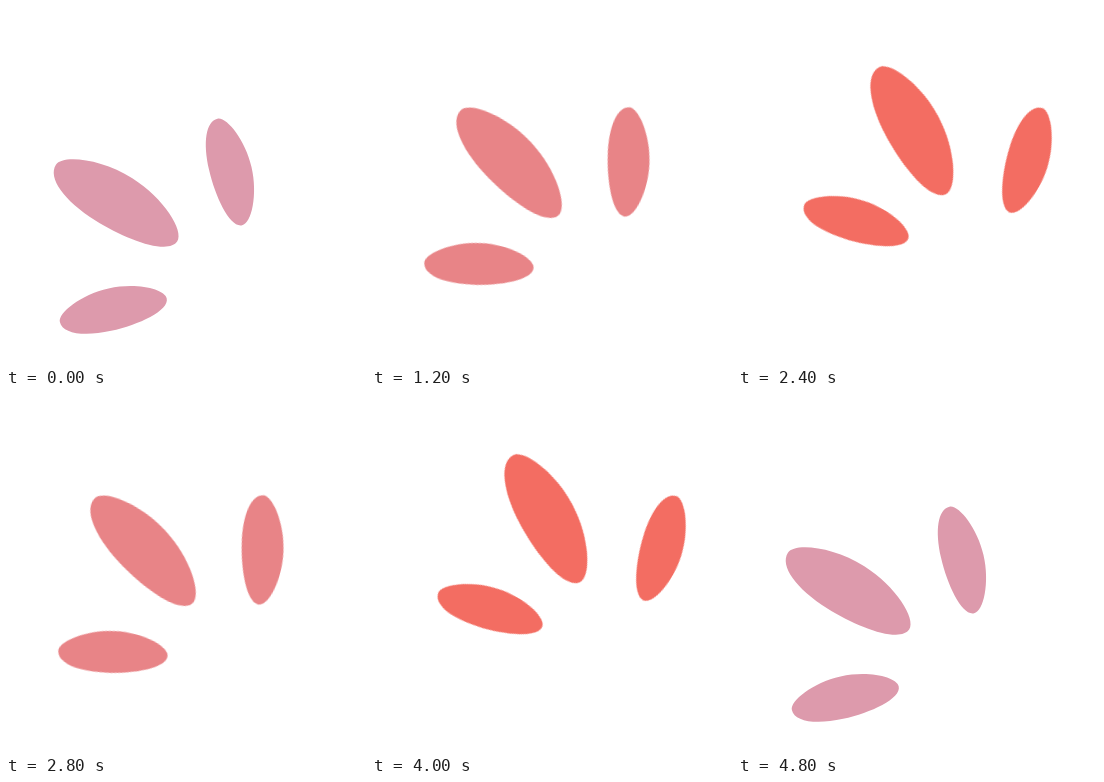
Recreate the animation shown at these times as an HTML page without scripts. Size 360 px wide and 360 px high, loop 5.2 s.

```html
<!DOCTYPE html>
<html lang="en">
<head>
<meta charset="utf-8">
<title>Swinging petals</title>
<style>
  html, body {
    margin: 0;
    width: 100%;
    height: 100%;
    overflow: hidden;
    background: #fff;
  }

  svg {
    display: block;
    width: 100%;
    height: 100%;
  }

  /* The fan swings in hard 400 ms steps around its lower right pivot. */
  .fan {
    transform-origin: 277.7px 280.4px;
    animation: swing 5200ms step-end infinite;
  }

  @keyframes swing {
    0%, 30.769%, 61.538%, 92.307%, 100% {
      transform: rotate(0deg);
      fill: #dd9aac;
    }
    7.692%, 23.076%, 38.461%, 53.846%, 69.23%, 84.615% {
      transform: rotate(15deg);
      fill: #e88487;
    }
    15.384%, 46.153%, 76.923% {
      transform: rotate(30deg);
      fill: #f36d62;
    }
  }
</style>
</head>
<body>
<svg viewBox="0 0 360 360">
  <defs>
    <!-- Unit petal: outer tip on the left, fuller upper side, flatter lower side -->
    <path id="petal" d="M-1 0C-1-.43-.52-1.05 0-1.05S1-.46 1 0C1 .58 .4 .93-.12 .93S-1 .56-1 0Z"/>
  </defs>
  <g class="fan">
    <use href="#petal" transform="translate(107.3 304.2) rotate(-12.4) scale(54.7 21.2)"/>
    <use href="#petal" transform="translate(110.6 197) rotate(32.3) scale(71.8 28)"/>
    <use href="#petal" transform="translate(223.8 166) rotate(77) scale(54.7 21.2)"/>
  </g>
</svg>
</body>
</html>
```
